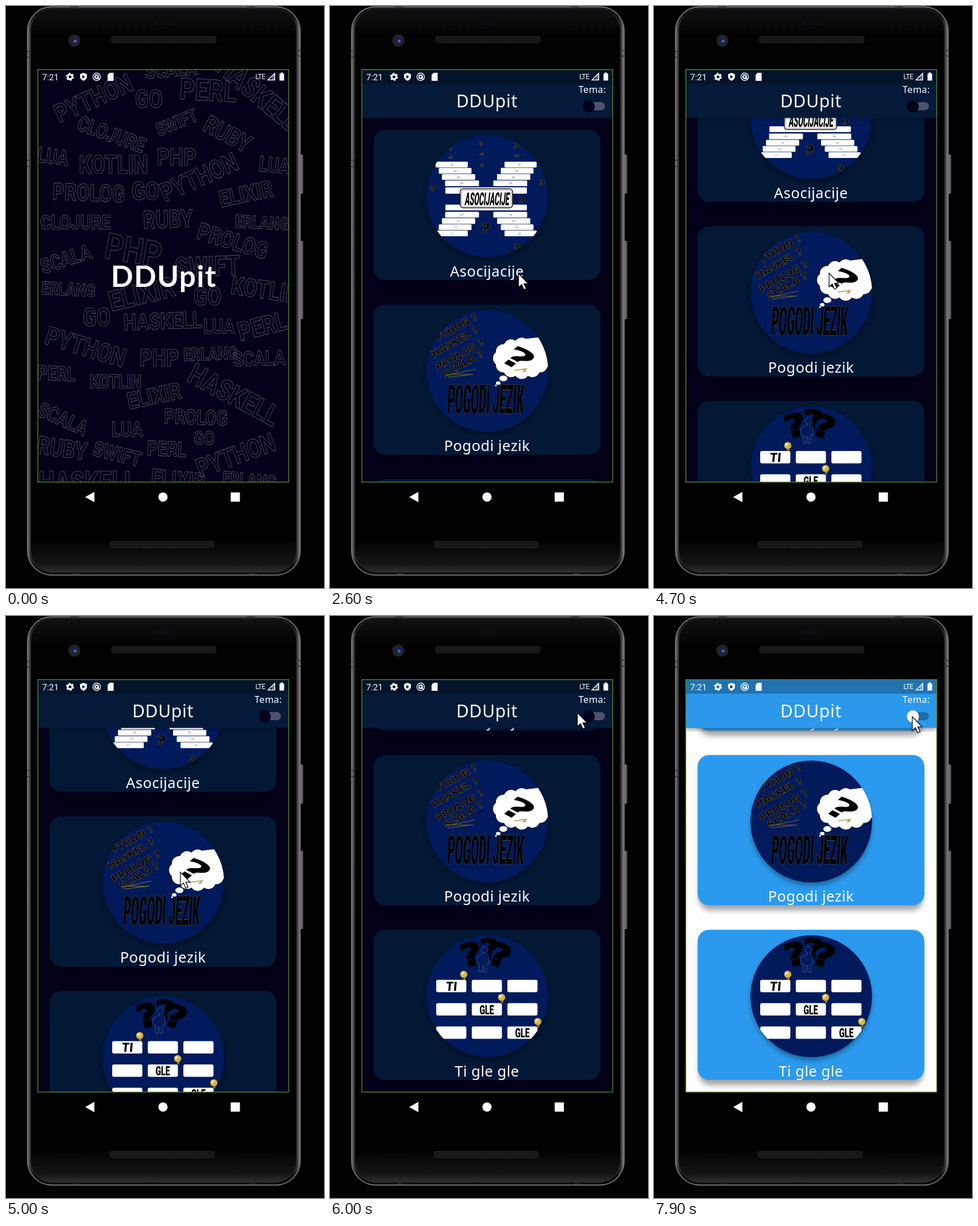
Write an HTML page that moves like this. It is 554 px wide and 1011 px high and loops after 8000 ms.

```html
<!DOCTYPE html>
<html lang="sr">
<head>
<meta charset="utf-8">
<title>Quiz app</title>
<style>
html, body { margin: 0; width: 100%; height: 100%; overflow: hidden; background: #000; }
svg { display: block; width: 100%; height: 100%; }
text { font-family: "Noto Sans", "Open Sans", sans-serif; fill: #fff; }
text.mid { text-anchor: middle; }
.words text { font: 700 40px Roboto, sans-serif; fill: none; stroke: #484756; stroke-width: 1.2; text-anchor: middle; }
.art text { font-family: "DejaVu Sans", Roboto, sans-serif; font-weight: 700; fill: #000; }
.gold text { stroke: #77642f; stroke-width: .6; }
.thick text { stroke: #000; stroke-width: 2.5; }
.art text.tall { font-family: Roboto, sans-serif; font-weight: 900; text-anchor: middle; }
.art text.tiny { font: 4px Roboto, sans-serif; fill: #555; text-anchor: middle; }
.bg { fill: var(--bg); }
.bar { fill: var(--bar); }
.card { fill: var(--card); }
</style>
</head>
<body>
<svg viewBox="0 0 554 1011" preserveAspectRatio="none">
  <defs>
    <linearGradient id="rim" x2="1" y2="0">
      <stop offset="0" stop-color="#77777a"/><stop offset=".012" stop-color="#2c2c2e"/>
      <stop offset=".03" stop-color="#08080a"/><stop offset=".97" stop-color="#08080a"/>
      <stop offset=".988" stop-color="#333336"/><stop offset="1" stop-color="#88888b"/>
    </linearGradient>
    <linearGradient id="face" x2="0" y2="1">
      <stop offset="0" stop-color="#111113"/><stop offset=".05" stop-color="#020203"/>
      <stop offset=".94" stop-color="#000"/><stop offset=".985" stop-color="#151516"/>
      <stop offset="1" stop-color="#303032"/>
    </linearGradient>
    <linearGradient id="key" x2="1" y2="0">
      <stop offset="0" stop-color="#2a2a2b"/><stop offset=".6" stop-color="#77777a"/><stop offset="1" stop-color="#333"/>
    </linearGradient>
    <clipPath id="screen"><rect x="56" y="111" width="436" height="716"/></clipPath>
    <clipPath id="disc"><circle r="106"/></clipPath>
    <filter id="blur" x="-20%" y="-20%" width="140%" height="140%"><feGaussianBlur stdDeviation="5"/></filter>
  </defs>

  <rect width="554" height="1011"/>
  <g fill="url(#key)">
    <rect x="510" y="258" width="8" height="68" rx="2"/>
    <rect x="510" y="408" width="8" height="136" rx="2"/>
  </g>
  <rect x="37.500" y="1.500" width="475" height="987" rx="42" fill="url(#rim)" stroke="#747477" stroke-width="1.800"/>
  <rect x="43" y="4" width="463" height="980" rx="38" fill="url(#face)" stroke="#242426" stroke-width="1.500"/>
  <path d="M36 79h7M36 89h7M36 268h6M36 279h6M506 77h7M506 87h7M116 987h12M424 987h12M113 2h14M420 2h14" stroke="#3b3b3d" stroke-width="2"/>
  <rect x="259" y="22" width="31" height="11" rx="4" fill="#0b0b10"/>
  <circle cx="119" cy="60" r="10.500" fill="#232328"/>
  <circle cx="119.500" cy="60" r="5.500" fill="#1b2450"/>
  <circle cx="120.500" cy="61" r="2.500" fill="#4767b8"/>
  <g fill="#161617" stroke="#29292a">
    <rect x="184" y="53" width="182" height="11" rx="4"/>
    <rect x="181" y="930" width="182" height="11" rx="4"/>
  </g>
  <path d="M188 58.500h174M185 935.500h174" stroke="#2c2c2d" stroke-width="2" stroke-dasharray="1 2"/>
  <path d="M138 853l16-9v18zM391.500 845h16v16h-16z" fill="#fff"/>
  <circle cx="273.500" cy="853" r="8" fill="#fff"/>

  <g clip-path="url(#screen)">
    <rect x="55" y="110" width="438" height="718" fill="#030019"/>
    <g id="words" class="words"></g>
    <text class="mid" x="275" y="488" style="font:700 51px Lato,sans-serif" letter-spacing="1.500">DDUpit</text>
    <g id="home">
      <rect class="bg" x="55" y="110" width="438" height="718"/>
      <g id="list"></g>
      <rect class="soft" x="55" y="186" width="438" height="12" filter="url(#blur)"/>
      <rect class="bar" x="55" y="110" width="438" height="84.500"/>
      <rect x="55" y="110" width="438" height="25" opacity=".25"/>
      <text class="mid" x="273.500" y="175.500" font-size="30" letter-spacing=".7">DDUpit</text>
      <text x="433" y="151" font-size="16.300" letter-spacing=".4">Tema:</text>
      <rect id="track" x="446" y="167" width="33" height="14" rx="7"/>
      <circle id="thumb" cx="451" cy="174.500" r="10.500"/>
    </g>
  </g>

  <g fill="#fff">
    <text x="63" y="128.500" style="font:15px Roboto,sans-serif">7:21</text>
    <circle cx="111.500" cy="123" r="4" fill="none" stroke="#fff" stroke-width="3"/>
    <circle cx="111.500" cy="123" r="6" fill="none" stroke="#fff" stroke-width="2" stroke-dasharray="3.140"/>
    <path d="M135 116l6 2.500v4q0 5-6 7.500q-6-2.500-6-7.500v-4z"/>
    <path d="M133 120l5 3-5 3z" fill="#061223"/>
    <circle cx="158" cy="123" r="6.500" fill="none" stroke="#fff" stroke-width="1.400"/>
    <circle cx="158" cy="123" r="3" fill="none" stroke="#fff" stroke-width="2"/>
    <path d="M158 123l5 5" stroke="#fff" stroke-width="1.600"/>
    <path d="M180.500 116h7v14h-10.500v-10.500z"/>
    <text x="434.500" y="127" style="font:12px Roboto,sans-serif" letter-spacing="-.6">LTE</text>
    <path d="M456.500 128.500h11.500v-11.500z" fill="none" stroke="#fff" stroke-width="1.500"/>
    <path d="M463 122v6h5v-11z" opacity=".35"/>
    <path d="M476.500 117.500h2v-2h4v2h2v12h-8z"/>
  </g>
  <rect x="55.500" y="110.500" width="437" height="716.500" fill="none" stroke="#5f8f1c" stroke-width="1.300"/>
  <path id="cursor" d="M0 0V24L5.500 19L9.500 28L13.500 26L9.500 17.500H17Z" fill="#fff" stroke="#000" stroke-width="1.200"/>
</svg>
<script>
const LOOP = 8000;
const $ = id => document.getElementById(id);
const range = n => [...Array(n).keys()];

// Each language: default size, then "x y angle size" spots
const words = {
  PYTHON: [45, "152 160 -24", "336 297 -24", "139 592 17", "400 780 -20"],
  GO: [44, "249 161", "243 321", "351 504", "158 540", "345 750 0 33"],
  PERL: [45, "352 146 3 52", "446 556 -14", "88 638 3 35", "280 769 3 36"],
  HASKELL: [50, "440 152 40", "273 547 -2 40", "397 675 28", "142 826"],
  CLOJURE: [36, "184 223 20", "121 375"],
  SWIFT: [36, "297 202 -22 32", "351 452 -2 48", "194 778 14"],
  RUBY: [43, "386 222 28", "282 370 -2", "98 768 8"],
  LUA: [37, "82 261 8", "468 276 6", "371 556", "211 735"],
  PHP: [43, "297 262", "222 424 10 62", "267 611"],
  KOTLIN: [44, "187 275", "452 493 8", "191 652 0 33"],
  PROLOG: [41, "144 324 2", "395 408 17", "331 714 2 36"],
  ELIXIR: [40, "418 326 -12", "236 500 -14 49", "258 677 -12", "300 822 5"],
  ERLANG: [31, "446 376 3", "109 492 3", "356 604 -2", "424 823 5"],
  SCALA: [36, "104 439 -18", "441 612 -2", "99 717 24", "287 110 -5"]
};

$("words").innerHTML = Object.entries(words).map(([word, [base, ...spots]]) =>
  spots.map(spot => {
    const [x, y, angle = 0, size = base] = spot.split(" ");
    return `<text transform="translate(${x} ${y}) rotate(${angle}) scale(.8 1)" y="${size * .355}" style="font-size:${size}px">${word}</text>`;
  }).join("")).join("");

const box = (x, y, w, h, r = 1.5) =>
  `<rect x="${x}" y="${y}" width="${w}" height="${h}" rx="${r}" fill="#fff"/>`;
const mark = (x, y, size, angle = 0, flat = 1) =>
  `<text transform="translate(${x} ${y}) rotate(${angle}) scale(1.2 ${flat})" text-anchor="middle" y="${size * .36}" font-size="${size}">?</text>`;
const tall = (word, x, y, size, squeeze, skew = 0) =>
  `<text class="tall" transform="translate(${x} ${y}) skewX(${skew}) scale(${squeeze} 1)" font-size="${size}">${word}</text>`;

// Art is drawn around the centre of its disc
function stairs() {
  const steps = range(4).map(i => {
    const x = -90 + 5.5 * i, w = 56 + i;
    return [-60 + 10.8 * i, 59.5 - 10.8 * i].map((y, k) =>
      box(x, y, w, 10) + box(-4 - x - w, y, w, 10) +
      `<text class="tiny" x="${x + 29}" y="${y + 6.5}">${"AC"[k]}${i + 1}</text>` +
      `<text class="tiny" x="${-33 - x}" y="${y + 6.5}">${"BD"[k]}${i + 1}</text>`).join("");
  }).join("");
  const marks = mark(-10, -92, 15, 15, .6) + mark(50, -87, 16, 25, .7) + mark(-64, -82, 13, -30, .6) +
    mark(-9, -54, 12, 10, .7) + mark(95, -23, 17, 20, .8) + mark(-95, -13, 15, 15, .8) +
    mark(60, 7, 18, 20, .7) + mark(-3, 56, 26, 8, .9) + mark(51, 88, 20, 20, .7) +
    mark(-10, -73, 9, 80) + mark(-64, -67, 8, 80) + mark(51, -70, 9, 80);
  return `<g class="gold">${marks}</g>` + steps + box(-73, -15.5, 142, 11) + box(-73, 14.5, 142, 10) +
    `<rect x="-47" y="-13" width="91" height="33" rx="5" fill="#fff" stroke="#111" stroke-width="1.5"/>
     <rect x="-44.500" y="-10.500" width="86" height="28" rx="3" fill="none" stroke="#aaa"/>` +
    tall("ASOCIJACIJE", -1, 15, 31, .4, -6);
}

function guess() {
  const lines = [["YTHON ?", -87, -50], ["HASKEL ?", -93, -23], ["PROLOG ?", -86, 0], ["SCALA ?", -73, 12]]
    .map(([s, x, y]) => `<text transform="translate(${x} ${y}) rotate(-29.500)" font-size="17">${s}</text>`).join("");
  const puffs = range(12).map(i => {
    const a = i * Math.PI / 6;
    return `<circle cx="${60 + 37 * Math.cos(a)}" cy="${-22 + 23 * Math.sin(a)}" r="13"/>`;
  }).join("");
  return `<g class="gold">${lines}${tall("POGODI JEZIK", -4, 74, 71, .285, -3)}</g>
    <path d="M-73 8l52-11M-70 6h46M-68 11l42-5" stroke="#74642f" stroke-width="1.2"/>
    <g stroke="#000" stroke-width="1.2">${puffs}</g>
    <g fill="#fff">${puffs}<ellipse cx="60" cy="-22" rx="40" ry="25"/><path d="M60-55l34-4 18 52H80z"/>
    <ellipse cx="28" cy="13" rx="7" ry="5"/><ellipse cx="19" cy="21" rx="4" ry="3"/><circle cx="15" cy="25" r="1.500"/></g>
    <path d="M47-1l22-3-7 5 6-1" fill="none" stroke="#b09a55" stroke-width="1.5"/>` +
    `<g transform="translate(54 -22) rotate(28) skewX(-22) scale(1.3 1)">${mark(0, 0, 53)}</g>`;
}

function tiles() {
  const bulb = (x, y) => `<g transform="translate(${x} ${y})"><circle r="6.200" fill="#d6b542"/>
    <circle cx="-2" cy="-2" r="2.500" fill="#f4e39a"/><path d="M-1 5l4 0-1 5h-2z" fill="#a88b2c"/></g>`;
  const grid = range(9).map(i => box(-89 + i % 3 * 62, -28.5 + (i / 3 | 0) * 40.5, 52.5, 21.5, 3)).join("");
  return `<g class="thick">${mark(-28, -73, 54, -14)}${mark(3, -82, 52, 4, .9)}${mark(22, -71, 54, 20)}</g>
    <path d="M-6-75a6 6 0 1 1 3 0l6 6v13h-4v14h-5v-11h-3v11h-5v-14h-4v-12z" fill="#001a5c" stroke="#7d8bb5" stroke-dasharray="1.5 2"/>` +
    grid + tall("TI", -63, -10, 22, .95, -5) + tall("GLE", -1, 31, 22, .64) + tall("GLE", 61, 71, 22, .64) +
    bulb(-41, -38) + bulb(25, 2) + bulb(88, 44);
}

$("list").innerHTML = [["Asocijacije", stairs], ["Pogodi jezik", guess], ["Ti gle gle", tiles]].map(([name, art], i) =>
  `<g transform="translate(0 ${215 + 303.5 * i})">
    <rect class="soft" x="78" y="9" width="391" height="261" rx="20" filter="url(#blur)"/>
    <rect class="card" x="76" width="395" height="261" rx="20"/>
    <circle cx="274" cy="121" r="105" opacity=".38" filter="url(#blur)"/>
    <g class="art" transform="translate(274 115.500)" clip-path="url(#disc)"><circle r="106" fill="#001a5c"/>${art()}</g>
    <text class="mid" x="273.500" y="254.500" font-size="25.500" letter-spacing=".5">${name}</text>
  </g>`).join("");

const clamp = v => Math.max(0, Math.min(1, v));
const smooth = v => v * v * (3 - 2 * v);

// Keys are [time, ...values]
function follow(keys, t) {
  const i = keys.findIndex(k => k[0] > t);
  if (i < 0) return keys[keys.length - 1].slice(1);
  if (!i) return keys[0].slice(1);
  const a = keys[i - 1], b = keys[i], p = smooth((t - a[0]) / (b[0] - a[0]));
  return a.slice(1).map((v, n) => v + (b[n + 1] - v) * p);
}
const mix = (a, b, p) => `rgb(${a.map((v, i) => Math.round(v + (b[i] - v) * p))})`;

const pointer = [[2500, 330, 468], [2850, 322, 452], [3500, 320, 316], [4050, 320, 316], [4600, 305, 464],
  [4750, 305, 464], [5300, 302, 420], [5500, 302, 416], [6000, 431, 168], [6300, 448, 174], [7200, 450, 175]];
const drag = [[2850, 0], [3500, 136], [4750, 136], [5300, 215.5]];
const soft = document.querySelectorAll(".soft");
const root = document.documentElement.style;

function draw(t) {
  const open = smooth(clamp((t - 450) / 300));
  const light = clamp((t - 7450) / 200);
  const fling = 61.5 * (1 - (1 - clamp((t - 5300) / 300)) ** 3);
  const scroll = follow(drag, t)[0] + fling;
  const [x, y] = follow(pointer, t);

  $("home").setAttribute("opacity", open);
  $("list").setAttribute("transform", `translate(0 ${-scroll})`);
  $("cursor").setAttribute("transform", `translate(${x} ${y})`);
  $("cursor").setAttribute("visibility", t < 2500 ? "hidden" : "visible");
  root.setProperty("--bg", mix([3, 0, 25], [255, 255, 255], light));
  root.setProperty("--bar", mix([4, 26, 56], [43, 152, 236], light));
  root.setProperty("--card", mix([3, 24, 53], [43, 154, 238], light));
  $("thumb").setAttribute("fill", mix([3, 0, 28], [255, 255, 255], light));
  $("track").setAttribute("fill", mix([78, 83, 107], [30, 108, 168], light));
  soft.forEach(s => s.setAttribute("opacity", .15 + .2 * light));
}

const start = performance.now();
function tick() {
  draw((performance.now() - start) % LOOP);
  requestAnimationFrame(tick);
}
tick();
</script>
</body>
</html>
```
